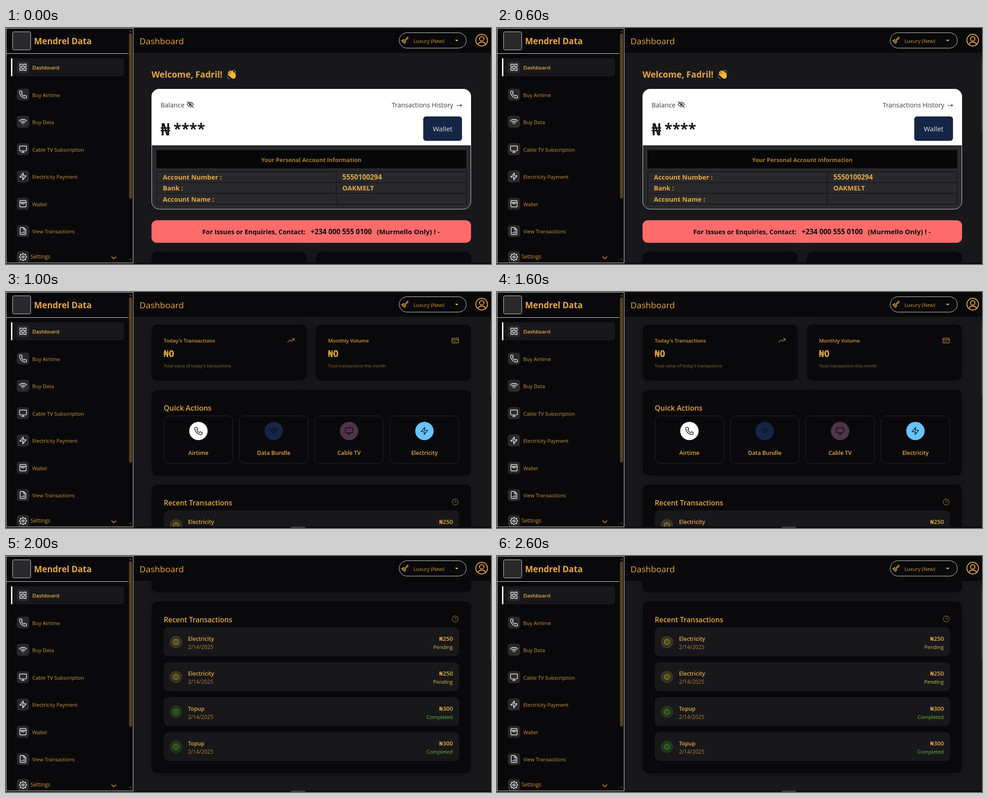
An HTML page that plays this animation: 1070x523 px, repeating every 3000 ms.

```html
<!DOCTYPE html>
<html lang="en">
<head>
<meta charset="utf-8">
<title>Dashboard</title>
<style>
  html, body { margin: 0; width: 100%; height: 100%; overflow: hidden; background: #09090b; }
  svg { display: block; width: 1070px; height: 523px; }
  text { font-family: "Open Sans", "Noto Sans", sans-serif; white-space: pre; }
</style>
</head>
<body>
<svg id="stage" viewBox="0 0 1070 523" xmlns="http://www.w3.org/2000/svg"></svg>
<script>
const GOLD = "#e5a946", DIM = "#cf983f", FAINT = "#987031";
const INK = "#09090b", PANEL = "#18181b", TILE = "#29292c", NAVY = "#152545";

const rect = (x, y, w, h, fill, r = 0, more = "") =>
  `<rect x="${x}" y="${y}" width="${w}" height="${h}" rx="${r}" fill="${fill}" ${more}/>`;
const circle = (x, y, r, fill, more = "") =>
  `<circle cx="${x}" cy="${y}" r="${r}" fill="${fill}" ${more}/>`;
const line = (d, color, w = 1, more = "") =>
  `<path d="${d}" fill="none" stroke="${color}" stroke-width="${w}" ${more}/>`;
const text = (s, x, y, size, fill = GOLD, weight = 400, anchor = "start") =>
  `<text x="${x}" y="${y}" font-size="${size}" fill="${fill}" font-weight="${weight}" text-anchor="${anchor}">${s}</text>`;

// Gear outline: eight teeth around a ring
const gear = () => {
  const pts = [];
  for (let i = 0; i < 32; i++) {
    const a = (i - 0.5) * Math.PI / 16, r = i % 4 < 2 ? 10.5 : 8;
    pts.push((12 + r * Math.cos(a)).toFixed(1) + " " + (12 + r * Math.sin(a)).toFixed(1));
  }
  return "M" + pts.join("L") + "zM15 12a3 3 0 1 1-6 0a3 3 0 1 1 6 0z";
};

// Icons on a 24-unit grid
const ICONS = {
  grid: "M3 3h7v7H3zM14 3h7v7h-7zM14 14h7v7h-7zM3 14h7v7H3z",
  phone: "M4 2h4l2 5-2.5 2.2a16 16 0 0 0 7.3 7.3l2.2-2.5 5 2v4a2 2 0 0 1-2 2A18 18 0 0 1 2 4a2 2 0 0 1 2-2z",
  wifi: "M1.5 9a15.5 15.5 0 0 1 21 0M5 12.7a10.5 10.5 0 0 1 14 0M8.5 16.3a5.2 5.2 0 0 1 7 0M12 20h.01",
  screen: "M4 3h16a2 2 0 0 1 2 2v10a2 2 0 0 1-2 2H4a2 2 0 0 1-2-2V5a2 2 0 0 1 2-2zM8 21h8M12 17v4",
  bolt: "M13 2 3 14h9l-1 8 10-12h-9z",
  wallet: "M5 3h14a2 2 0 0 1 2 2v14a2 2 0 0 1-2 2H5a2 2 0 0 1-2-2V5a2 2 0 0 1 2-2zM3 8.5h18M8 8.5a4 4 0 0 0 8 0",
  report: "M14 2H6a2 2 0 0 0-2 2v16a2 2 0 0 0 2 2h12a2 2 0 0 0 2-2V8zM14 2v6h6M8 18v-2M12 18v-4M16 18v-6",
  gear: gear(),
  eyeOff: "M2 12q10-15 20 0q-10 15-20 0zM15 12a3 3 0 1 1-6 0a3 3 0 1 1 6 0zM2 2l20 20",
  trend: "M1 18l8-8 5 5 9-9M16 6h7v7",
  card: "M3 4h18a2 2 0 0 1 2 2v12a2 2 0 0 1-2 2H3a2 2 0 0 1-2-2V6a2 2 0 0 1 2-2zM1 9.5h22M5 15h3M11 15h2",
  clock: "M22 12a10 10 0 1 1-20 0a10 10 0 1 1 20 0zM12 6v6h5",
  alert: "M22 12a10 10 0 1 1-20 0a10 10 0 1 1 20 0zM12 7v6M12 16.5h.01",
  brush: "M14 10l5-7.5q2-2 3 0t0 3l-7.5 6zM8 9l7 7M8 9l-6 4 9 9 4-6M5 15l3-2M8 18l3-2",
  user: "M22.5 12a10.5 10.5 0 1 1-21 0a10.5 10.5 0 1 1 21 0zM16 9.5a4 4 0 1 1-8 0a4 4 0 1 1 8 0zM5 19.5a8 8 0 0 1 14 0"
};
const icon = (name, cx, cy, size, color, w = 1.3) => {
  const k = size / 24;
  return `<g transform="translate(${cx - size / 2} ${cy - size / 2}) scale(${k})">` +
    line(ICONS[name], color, w / k, 'stroke-linecap="round" stroke-linejoin="round"') + "</g>";
};

const wave = () => `<g transform="translate(487 92)">
  <g stroke="#f6b82f" stroke-linecap="round" fill="none">
    <path d="M4 6l8 8M7 3.5l8 9M11.5 3.5l6 8M3.5 10.5l7 6" stroke-width="3"/>
    <path d="M17.5 14l.5-6" stroke-width="2.8"/>
  </g>
  <path d="M7 12l6-5 6.5 4q1.5 6-2 8.5-4 2.5-8-1.5z" fill="#f6b82f"/>
  ${line("M14.5 1.5q4 .5 5 4M1 15q.5 4 4.5 5.5", "#2f9fb5", 1.4, 'stroke-linecap="round"')}
</g>`;

const MENU = [
  ["grid", "Dashboard"], ["phone", "Buy Airtime"], ["wifi", "Buy Data"],
  ["screen", "Cable TV Subscription"], ["bolt", "Electricity Payment"],
  ["wallet", "Wallet"], ["report", "View Transactions"]
];
const tile = (name, y) => rect(24, y - 13.3, 27, 26.6, TILE, 6) + icon(name, 37.5, y, 18.5, "#f4f4f5", 1.4);

const sidebar = () => rect(0, 0, 281, 520, INK) +
  rect(14.5, 8.5, 40, 40, TILE, 3, 'stroke="#d4d4d8"') +
  text("Mendrel Data", 62, 36, 18.7, GOLD, 700) +
  line("M0 56.5H270", "#d9d9d9") +
  rect(11, 67, 249, 40, PANEL, 6) + rect(11, 67, 3, 40, "#fff", 1) +
  MENU.map(([name, label], i) => {
    const y = 87 + i * 60.5;
    return tile(name, y) + text(label, 58, y + 5, 11.3, i ? DIM : GOLD, i ? 400 : 600);
  }).join("") +
  `<g clip-path="url(#side)">${tile("gear", 507.5)}</g>` +
  text("Settings", 54, 511, 11.8, DIM) +
  line("M232.5 506.5l5.3 5 5.3-5", GOLD, 1.3) +
  rect(271.5, 12, 6.5, 366, "#594321", 3) +
  `<path d="M272 9l3-3.5 3 3.5zM272 511.5l3 3.5 3-3.5z" fill="#594321"/>` +
  line("M.5 0V520.5H280.5V0M0 .5H280", "#d9d9d9");

const header = () => rect(281, 0, 789, 55, INK) +
  text("Dashboard", 294.5, 36, 19) +
  rect(867.5, 10.5, 148, 34, INK, 17, 'stroke="#d6d3cd"') +
  icon("brush", 880, 27.5, 16.5, GOLD, 1.4) +
  text("Luxury (New)", 899, 33, 11.1, DIM) +
  `<path d="M990.5 26h7.5l-3.75 4z" fill="${GOLD}"/>` +
  icon("user", 1049.5, 27, 29.5, GOLD, 2);

const balance = () =>
  text("Welcome, Fadril!", 321, 110, 19, GOLD, 700) + wave() +
  rect(321.5, 135.5, 704, 266, TILE, 17, 'stroke="#d4d4d8"') +
  `<path d="M321 260V152a17 17 0 0 1 17-17H1009a17 17 0 0 1 17 17V260z" fill="#fff"/>` +
  text("Balance", 341, 176, 14.4, "#3a3a3d") + icon("eyeOff", 406.5, 169.5, 16.5, "#151517", 1.3) +
  text("Transactions History", 851, 176, 14.35, "#3a3a3d") +
  line("M994 171.5h11M1002 168.5l3.2 3-3.2 3", "#3a3a3d", 1.1) +
  text('₦<tspan font-size="32" dx="7" dy="-3">****</tspan>', 341, 238, 37.5, "#18181b", 700) +
  rect(920.5, 196, 85.5, 54, NAVY, 6) + text("Wallet", 963.2, 229, 15.1, "#dfe1e6", 400, "middle") +
  rect(332, 270.5, 683.5, 40.5, "#070708") +
  text("Your Personal Account Information", 673.7, 297, 12.6, "#a97c35", 700, "middle") +
  line("M332.5 318.5H1015.5V390.5H332.5zM332.5 342.5H1015.5M332.5 366.5H1015.5M728.5 318.5V390.5", "#0c0c0e") +
  ["Account Number :", "Bank :", "Account Name :"].map((s, i) => text(s, 346, 336 + i * 24.3, 14.4, GOLD, 700)).join("") +
  text("5550100294", 742, 336, 15.3, GOLD, 700) + text("OAKMELT", 742, 360.3, 14.7, GOLD, 700) +
  rect(321, 426, 705, 50, "#ff6b6b", 12) +
  text("For Issues or Enquiries, Contact:", 433, 457, 14.3, "#0a0a0a", 700) +
  text("+234 000 555 0100", 672, 457, 15.4, "#0a0a0a", 700) +
  text("(Murmello Only) ! -", 818, 457, 15, "#0a0a0a", 700);

const card = (x, y, w, h) => rect(x, y, w, h, INK, 13, 'filter="url(#shade)"');

const stat = (x, title, sub, name) => card(x, 496, 342.5, 124) +
  text(title, x + 27, 536, 11.4, DIM, 600) + text("₦0", x + 26.5, 568, 20.5, GOLD, 700) +
  text(sub, x + 27, 591, 9.42, FAINT) + icon(name, x + 307.5, 531.5, 15.5, DIM, 1.1);

const ACTIONS = [
  ["phone", "Airtime", "#fff"], ["wifi", "Data Bundle", NAVY],
  ["screen", "Cable TV", "#50334a"], ["bolt", "Electricity", "#66c4ff"]
];
const actions = () => card(321, 641, 705, 189.5) +
  text("Quick Actions", 348, 687, 16, GOLD, 600) +
  ACTIONS.map(([name, label, fill], i) => {
    const x = 348.5 + i * 166.2, mid = x + 76;
    return rect(x, 698.5, 152, 105, "none", 11, 'stroke="#27272a"') +
      circle(mid, 732, 20.3, fill) + icon(name, mid, 732, 19.5, "#0b0b0d", 1.4) +
      text(label, mid, 785, 12.4, GOLD, 600, "middle");
  }).join("");

const STATES = {
  Pending: ["Electricity", "₦250", "#3b3620", "#cdb643", "#d9c251"],
  Completed: ["Topup", "₦300", "#22371a", "#62ad2c", "#6ebb35"]
};
const recent = () => card(321, 851, 705, 380) +
  text("Recent Transactions", 348, 896.5, 15.6, GOLD, 600) +
  icon("clock", 991, 889.5, 16, FAINT, 1.1) +
  ["Pending", "Pending", "Completed", "Completed"].map((state, i) => {
    const [what, sum, back, mark, tone] = STATES[state], y = 908 + i * 77.4;
    return rect(348, y, 651.5, 64, PANEL, 11) + circle(375, y + 32.5, 13.5, back) +
      icon("alert", 375, y + 32.5, 13, mark, 1.1) +
      text(what, 401.5, y + 30, 12.2, GOLD, 600) + text("2/14/2025", 401.5, y + 47.7, 11.8, "#ae8038") +
      text(sum, 986, y + 30, 13.2, GOLD, 600, "end") + text(state, 985.5, y + 47.7, 11.3, tone, 400, "end");
  }).join("");

const stage = document.getElementById("stage");
stage.innerHTML = `<defs>
    <clipPath id="side"><rect width="281" height="520"/></clipPath>
    <clipPath id="view"><rect x="281" y="55" width="789" height="465"/></clipPath>
    <filter id="shade" x="-10%" y="-30%" width="120%" height="160%" color-interpolation-filters="sRGB">
      <feDropShadow dx="0" dy="4" stdDeviation="9" flood-color="#000" flood-opacity=".25"/>
    </filter>
  </defs>` +
  rect(0, 0, 1070, 523, "#0b090a") + rect(281, 55, 789, 465, PANEL) +
  `<g clip-path="url(#view)"><g id="page">` + balance() +
  stat(321, "Today's Transactions", "Total value of today's transactions", "trend") +
  stat(683.5, "Monthly Volume", "Total transactions this month", "card") +
  actions() + recent() + "</g></g>" +
  header() + sidebar() + rect(1069, 67, 1, 163, "#594321") +
  `<g id="handle">${rect(628, 520, 32, 3, "#3c393b")}</g>`;

const page = document.getElementById("page"), handle = document.getElementById("handle");
const SCROLL = [0, 424, 750];

function draw(ms) {
  const step = Math.floor(ms % 3000 / 1000);
  page.setAttribute("transform", `translate(0 ${-SCROLL[step]})`);
  handle.setAttribute("visibility", step ? "visible" : "hidden");
}

const start = performance.now();
function tick() {
  draw(performance.now() - start);
  requestAnimationFrame(tick);
}
tick();
</script>
</body>
</html>
```
